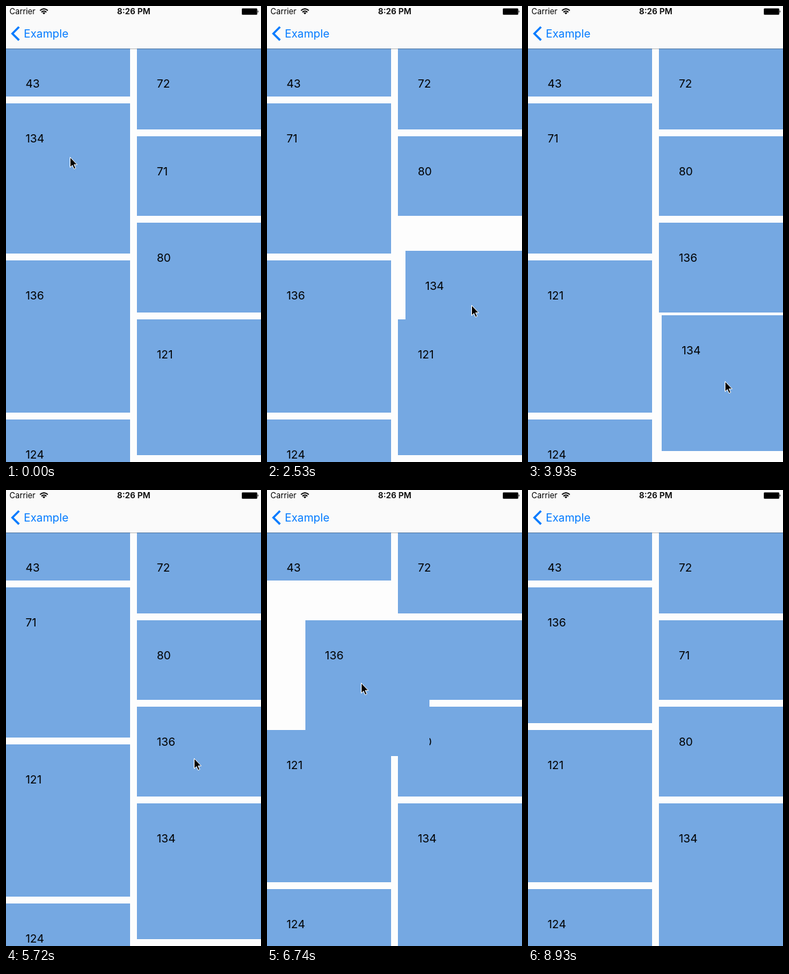
These frames come from a looping animation (372x665 px, 9390 ms). An HTML page:

```html
<!DOCTYPE html>
<html lang="en">
<head>
<meta charset="utf-8">
<title>Reorderable grid</title>
<style>
  html, body { margin: 0; width: 100%; height: 100%; overflow: hidden; background: #fdfdfd; }
  svg { display: block; width: 372px; height: 665px; font-family: Inter, Roboto, sans-serif; }
  #cells rect { fill: #75a8e2; }
  #cells text { font-size: 16.5px; }
</style>
</head>
<body>
<svg viewBox="0 0 372 665">
  <rect width="372" height="665" fill="#fdfdfd"/>
  <g id="cells"></g>

  <rect width="372" height="62" fill="#fafafa"/>
  <rect y="62" width="372" height="1" fill-opacity=".25"/>
  <text x="5" y="12.3" font-size="11.6">Carrier</text>
  <g fill="none" stroke="#000" stroke-width="1.7">
    <path d="M49.6 6.6Q55.3 1.6 61 6.6M51.7 9Q55.3 5.8 58.9 9"/>
    <path d="M53.2 10.1Q55.3 8.5 57.4 10.1L55.3 12.3Z" fill="#000" stroke="none"/>
  </g>
  <text x="186.3" y="12.3" font-size="12" font-weight="600" text-anchor="middle">8:26 PM</text>
  <rect x="344" y="3.5" width="22.5" height="9.3" rx="1.2"/>
  <path d="M367.3 6.3Q369.3 8 367.3 9.9Z"/>
  <path d="M19 30.5L9.3 40.2L19 49.9" fill="none" stroke="#007aff" stroke-width="3"/>
  <text x="26" y="46" font-size="16.2" fill="#007aff">Example</text>

  <path id="cursor" d="M.5 .5V15.3L3.8 12.2L6.2 17.6L8.7 16.5L6.3 11.3H10.8Z"
        stroke="#fff" stroke-linejoin="round"/>
</svg>
<script>
const LOOP = 9390, WIDTH = 181, RIGHT = 191.5, TOP = 62, GAP = 10;
const LAG = 40, MOVE = 300, LIFT = 220;

const clamp = v => Math.min(1, Math.max(0, v));
const ease = v => { v = clamp(v); return v * v * (3 - 2 * v); };
const mix = (a, b, k) => a + (b - a) * k;

// Key points of the pointer: time, x, y
const path = [
  [1680, 93, 220], [2060, 181, 250], [2530, 298, 436], [2750, 292, 482], [3100, 273, 555],
  [3930, 287, 547.5], [4050, 288, 528], [4410, 274, 391],
  [5900, 274, 391], [6740, 137, 281], [6860, 97, 242], [8320, 97, 242], [8930, 374, 670]
];

function slope(i, axis) {
  const a = path[i], b = path[i + 1];
  return a && b ? (b[axis] - a[axis]) / (b[0] - a[0]) : 0;
}

// Smooth through key points, but start and stop gently at rests
function tangent(i, axis) {
  const before = slope(i - 1, axis), after = slope(i, axis);
  return before && after ? (before + after) / 2 : 0;
}

function pointer(t) {
  let i = 0;
  while (i < path.length - 2 && t >= path[i + 1][0]) i++;
  const from = path[i], to = path[i + 1], span = to[0] - from[0], u = clamp((t - from[0]) / span);
  return [1, 2].map(axis => mix(from[axis], to[axis], ease(u)) +
    span * u * (1 - u) * ((1 - u) * tangent(i, axis) - u * tangent(i + 1, axis)));
}

// Every item goes to the shorter column
function layout(order, heights) {
  const next = [TOP, TOP], places = {};
  order.forEach((id, i) => {
    const col = next[0] <= next[1] ? 0 : 1;
    places[id] = { x: col * RIGHT, y: next[col], h: heights[i] };
    next[col] += heights[i] + GAP;
  });
  return places;
}

const order = [43, 72, 134, 71, 80, 136, 121, 124];
const heights = order.map(id => Math.round(id * 1.635));
const ids = [...order];

// An item moves to another index, or two heights are exchanged
const changes = [
  { at: 2095, id: 134, to: 3 },
  { at: 2210, id: 134, to: 4 },
  { at: 2640, id: 134, to: 6 },
  { at: 5750, exchange: [2, 6] },
  { at: 6420, id: 136, to: 2 }
];
const drags = [
  { id: 134, from: 1380, to: 3960 },
  { id: 136, from: 5730, to: 7250 }
];

const stages = [{ at: 0, places: layout(order, heights) }];
for (const { at, id, to, exchange } of changes) {
  if (exchange) {
    const [a, b] = exchange;
    [heights[a], heights[b]] = [heights[b], heights[a]];
  } else {
    order.splice(order.indexOf(id), 1);
    order.splice(to, 0, id);
  }
  stages.push({ at, places: layout(order, heights) });
}

const group = document.getElementById("cells");
const cursor = document.getElementById("cursor");

function add(parent, tag) {
  return parent.appendChild(document.createElementNS(group.namespaceURI, tag));
}

function set(node, attrs) {
  for (const name in attrs) node.setAttribute(name, attrs[name]);
}

const cells = ids.map(id => {
  const node = add(group, "g"), box = add(node, "rect"), label = add(node, "text");
  label.textContent = id;
  return { id, node, box, label };
});

function placeAt(id, t) {
  const place = { ...stages[0].places[id] };
  for (const { at, places } of stages.slice(1)) {
    const k = ease((t - at) / MOVE);
    for (const key in place) place[key] = mix(place[key], places[id][key], k);
  }
  return place;
}

function draw(t) {
  for (const { id, node, box, label } of cells) {
    const place = placeAt(id, t);
    const drag = drags.find(d => d.id === id && t > d.from && t < d.to + MOVE);
    if (drag) {
      const hold = ease((t - drag.from) / LIFT) - ease((t - drag.to) / MOVE);
      const [x, y] = pointer(Math.min(t, drag.to) - LAG);
      place.x = mix(place.x, x - WIDTH / 2, hold);
      place.y = mix(place.y, y - place.h / 2, hold);
      if (group.lastChild !== node) group.appendChild(node);
    }
    const y = Math.floor(place.y);
    set(box, { x: Math.floor(place.x), y, width: WIDTH, height: Math.round(place.h) });
    set(label, { x: place.x + 28.4, y: y + 57 });
  }
  const [x, y] = pointer(t).map(Math.round);
  set(cursor, { transform: `translate(${x} ${y})` });
}

const begin = performance.now();
function frame() {
  draw((performance.now() - begin) % LOOP);
  requestAnimationFrame(frame);
}
frame();
</script>
</body>
</html>
```
